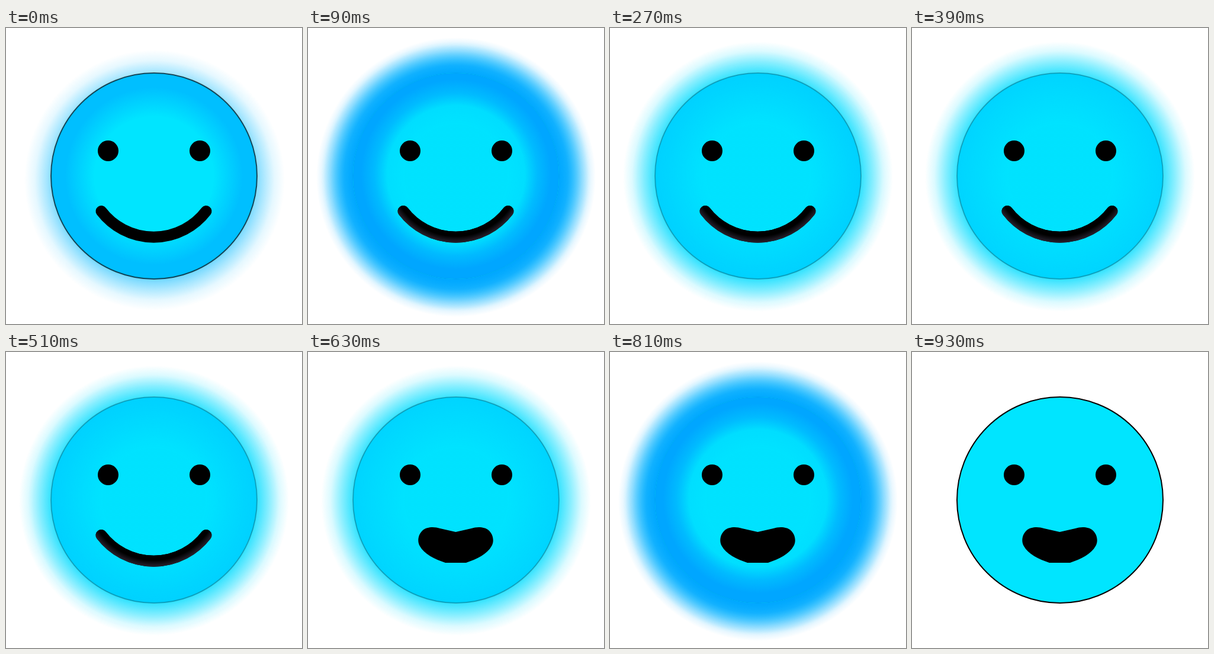
Recreate the animation shown at these times as an HTML page. Size 500 by 500 pixels, loop 0.96 s.

```html
<!DOCTYPE html>
<html lang="en">
<head>
<meta charset="utf-8">
<title>Glowing smiley</title>
<style>
  html, body { margin: 0; width: 100%; height: 100%; overflow: hidden; background: #fff; }
  svg { display: block; width: 100vw; height: 100vh; }

  /* the glow pulses four times per loop, in eight hard steps */
  .soft, .cyan, .deep, .line { animation: 240ms step-end infinite; }
  .soft { animation-name: soft; }
  .cyan { animation-name: cyan; }
  .deep { animation-name: deep; }
  .line { animation-name: line; }
  .smile, .laugh { animation: smile 960ms step-end infinite; }
  .laugh { animation-name: laugh; }

  @keyframes soft {
    0% { opacity: 1 } 12.5% { opacity: .1 } 25% { opacity: 0 }
    75% { opacity: 1 } 87.5%, 100% { opacity: 0 }
  }
  @keyframes cyan {
    0% { opacity: 0 } 12.5% { opacity: 1 } 75%, 100% { opacity: 0 }
  }
  @keyframes deep {
    0% { opacity: 0 } 25% { opacity: .5 } 37.5% { opacity: 1 }
    50% { opacity: .5 } 62.5%, 100% { opacity: 0 }
  }
  @keyframes line {
    0% { opacity: .65 } 12.5% { opacity: .25 } 25% { opacity: .15 }
    37.5% { opacity: .02 } 50% { opacity: .15 } 62.5% { opacity: .25 }
    75% { opacity: .65 } 87.5%, 100% { opacity: 1 }
  }
  @keyframes smile { 0% { opacity: 1 } 59.375%, 100% { opacity: 0 } }
  @keyframes laugh { 0% { opacity: 0 } 59.375%, 100% { opacity: 1 } }
</style>
</head>
<body>
<svg viewBox="0 0 500 500">
  <defs>
    <radialGradient id="softHalo">
      <stop offset=".76" stop-color="#00b8ff" stop-opacity=".56"/>
      <stop offset=".84" stop-color="#00b8ff" stop-opacity=".32"/>
      <stop offset=".92" stop-color="#00b8ff" stop-opacity=".1"/>
      <stop offset="1" stop-color="#00b8ff" stop-opacity="0"/>
    </radialGradient>
    <radialGradient id="cyanHalo">
      <stop offset=".76" stop-color="#00dcff" stop-opacity=".8"/>
      <stop offset=".85" stop-color="#00dcff" stop-opacity=".46"/>
      <stop offset=".93" stop-color="#00dcff" stop-opacity=".14"/>
      <stop offset="1" stop-color="#00dcff" stop-opacity="0"/>
    </radialGradient>
    <radialGradient id="deepHalo">
      <stop offset=".74" stop-color="#00a6ff" stop-opacity=".97"/>
      <stop offset=".8" stop-color="#00a6ff" stop-opacity=".85"/>
      <stop offset=".88" stop-color="#00a6ff" stop-opacity=".46"/>
      <stop offset=".95" stop-color="#00a6ff" stop-opacity=".12"/>
      <stop offset="1" stop-color="#00a6ff" stop-opacity="0"/>
    </radialGradient>
    <radialGradient id="softRing">
      <stop offset=".58" stop-color="#00bfff" stop-opacity="0"/>
      <stop offset=".86" stop-color="#00bfff"/>
    </radialGradient>
    <radialGradient id="cyanRing">
      <stop offset=".5" stop-color="#00d4ff" stop-opacity=".1"/>
      <stop offset="1" stop-color="#00d4ff"/>
    </radialGradient>
    <radialGradient id="deepRing" cy=".492">
      <stop offset=".67" stop-color="#00a6ff" stop-opacity="0"/>
      <stop offset=".79" stop-color="#00a6ff" stop-opacity=".6"/>
      <stop offset=".92" stop-color="#00a6ff"/>
    </radialGradient>
    <radialGradient id="lip" gradientUnits="userSpaceOnUse" cx="249.5" cy="241" r="123">
      <stop offset=".9" stop-color="#000"/>
      <stop offset="1" stop-color="#2c2634"/>
    </radialGradient>
    <path id="arc" d="M161 309.5A111.5 111.5 0 0 0 338 309.5" fill="none"
          stroke-width="19" stroke-linecap="round"/>
  </defs>

  <circle class="soft" cx="251" cy="257" r="220" fill="url(#softHalo)"/>
  <circle class="cyan" cx="250" cy="251" r="228" fill="url(#cyanHalo)"/>
  <circle class="deep" cx="250" cy="252" r="236" fill="url(#deepHalo)"/>

  <circle cx="250" cy="250" r="174" fill="#00e5ff"/>
  <circle class="cyan" cx="250" cy="250" r="174" fill="url(#cyanRing)"/>
  <circle class="soft" cx="250" cy="250" r="174" fill="url(#softRing)"/>
  <circle class="deep" cx="250" cy="250" r="174" fill="url(#deepRing)"/>
  <circle class="line" cx="250" cy="250" r="174" fill="none" stroke="#000" stroke-width="2"/>

  <circle cx="172.5" cy="207.5" r="17.5"/>
  <circle cx="327.5" cy="207.5" r="17.5"/>
  <g class="smile">
    <use href="#arc" stroke="#000"/>
    <use class="cyan" href="#arc" stroke="url(#lip)"/>
  </g>
  <path class="laugh" d="M249.5 304L223 298C214 295 201 295 194 301C186 308 184 320 189 328C196 341 214 350 232 356H267C285 350 303 341 310 328C315 320 313 308 305 301C298 295 285 295 276 298Z"/>
</svg>
</body>
</html>
```
